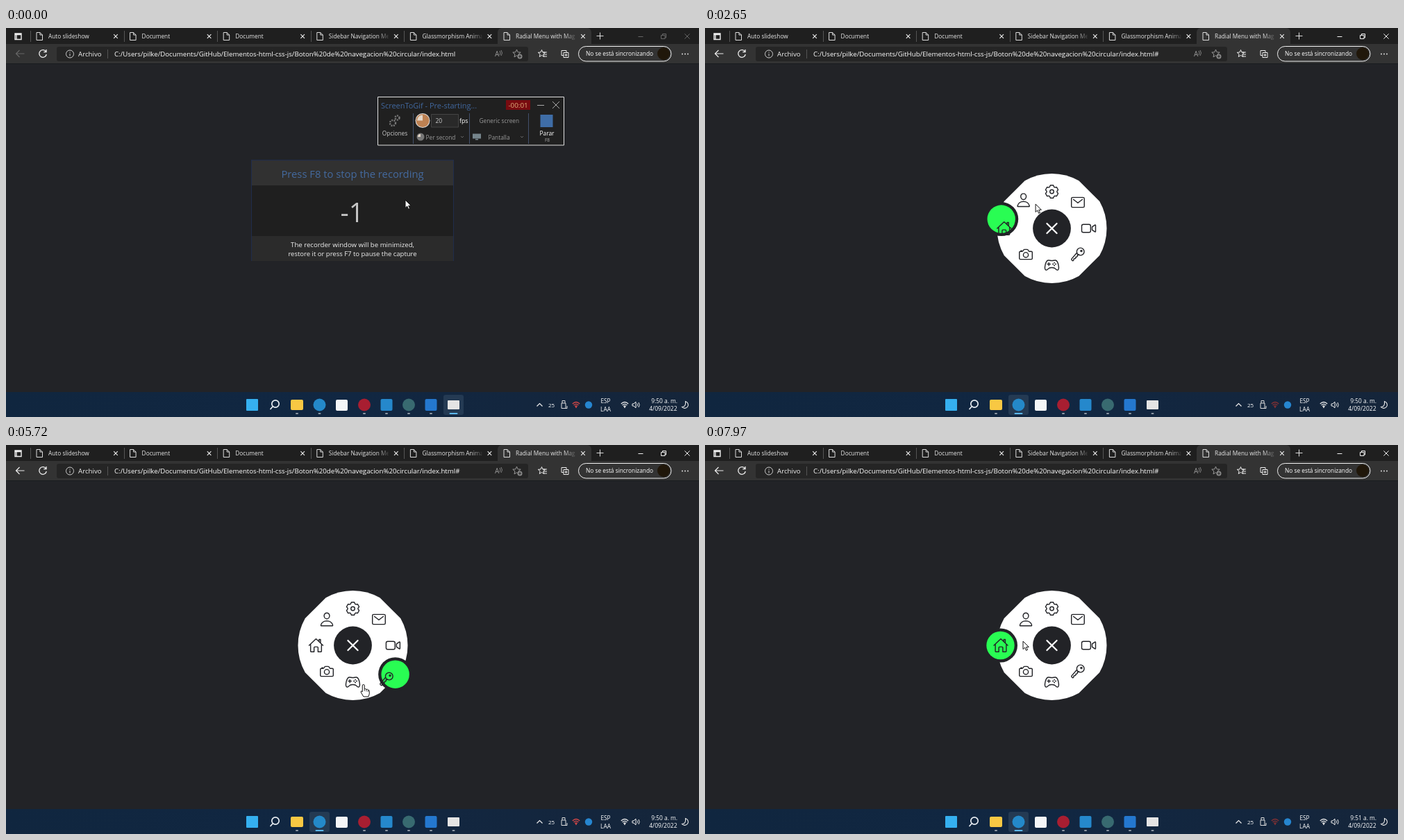
Write an HTML page with a canvas that moves like this. It is 998 px wide and 561 px high and loops after 8000 ms.

```html
<!DOCTYPE html>
<html lang="es">
<head>
<meta charset="utf-8">
<title>Radial menu</title>
<style>
html, body { margin: 0; width: 100%; height: 100%; overflow: hidden; background: #222327; }
canvas { display: block; }
</style>
</head>
<body>
<canvas id="stage" width="998" height="561"></canvas>
<script>
const c = document.getElementById('stage').getContext('2d');
const LOOP = 8000, CX = 499.5, CY = 289, BG = '#222327', INK = '#fff';
const PATH = 'C:/Users/pilke/Documents/GitHub/Elementos-html-css-js/';

const clamp = v => Math.max(0, Math.min(1, v));
const lerp = (a, b, k) => a + (b - a) * k;
const span = (t, from, to) => clamp((t - from) / (to - from));

// CSS "ease": cubic-bezier(.25, .1, .25, 1)
function ease(x) {
  if (x <= 0 || x >= 1) return clamp(x);
  let lo = 0, hi = 1;
  for (let n = 0; n < 20; n++) {
    const u = (lo + hi) / 2, v = 1 - u;
    if (.75 * v * v * u + .75 * v * u * u + u * u * u < x) lo = u; else hi = u;
  }
  return .3 * (1 - lo) ** 2 * lo + 3 * (1 - lo) * lo * lo + lo ** 3;
}

function text(str, x, y, size, color = INK, align = 'left') {
  c.font = `${size}px "Open Sans", "Noto Sans", sans-serif`;
  c.textAlign = align;
  c.fillStyle = color;
  c.fillText(str, x, y);
}
function box(x, y, w, h, color, r = 0) {
  c.fillStyle = color;
  c.beginPath();
  c.roundRect(x, y, w, h, r);
  c.fill();
}
function frame(x, y, w, h, color, r = 0, width = 1) {
  c.strokeStyle = color;
  c.lineWidth = width;
  c.beginPath();
  c.roundRect(x, y, w, h, r);
  c.stroke();
}
function disc(x, y, r, color) {
  c.fillStyle = color;
  c.beginPath();
  c.arc(x, y, r, 0, 7);
  c.fill();
}
function line(d, x, y, color = INK, width = 1) {
  c.save();
  c.translate(x, y);
  c.strokeStyle = color;
  c.lineWidth = width;
  c.stroke(new Path2D(d));
  c.restore();
}
const cross = (x, y, r, color, width = 1) =>
  line(`M${-r} ${-r}L${r} ${r}M${r} ${-r}L${-r} ${r}`, x, y, color, width);

// ---- menu icons on a 512 grid ----
function gearPath() {
  let d = '';
  for (let k = 0; k < 6; k++)
    for (const [r, a] of [[168, -25], [212, -13], [212, 13], [168, 25]]) {
      const w = (k * 60 - 90 + a) * Math.PI / 180;
      d += (d ? 'L' : 'M') + (256 + r * Math.cos(w)) + ' ' + (256 + r * Math.sin(w));
    }
  return d + 'z';
}
const ring = (x, y, r) => `M${x + r} ${y}a${r} ${r} 0 10${-2 * r} 0a${r} ${r} 0 10${2 * r} 0`;
const ICONS = [
  'M80 212v236q0 16 16 16h96V328q0-24 24-24h80q24 0 24 24v136h96q16 0 16-16V212M480 256L267 52q-11-8-22 0L32 256M400 179V64h-48v69',
  'M344 144c-4 53-44 96-88 96s-84-43-88-96c-4-55 35-96 88-96s92 42 88 96zM256 304c-87 0-175 48-192 139q-1 21 16 21h352q17 0 16-21C431 352 343 304 256 304z',
  gearPath() + ring(256, 256, 62),
  'M88 96h336q40 0 40 40v240q0 40-40 40H88q-40 0-40-40V136q0-40 40-40zM112 160l144 112 144-112',
  'M375 309l82 58q23 8 23-15V160q0-23-23-15l-82 58q-7 5-7 13v80q0 8 7 13zM268 384H84q-52 0-52-52V180q0-52 52-52h184q52 0 52 52v152q0 52-52 52z',
  'M222 205L55 399q-14 16 3 36l18 18q14 14 24 8l24-24v-34l16-12 30 2 22-22-4-32 32-4 26-22-8-32 12-10 34 4 16-10' + ring(340, 167, 120) + ring(368, 144, 24),
  'M467 249c-18-83-45-136-89-149-46-12-70 12-122 12s-76-24-123-12c-44 13-71 66-90 149-19 85-15 152 22 165 26 9 49-10 71-37 25-31 56-41 120-41s94 10 119 41c22 27 46 45 71 37 41-14 40-79 21-165zM160 176v96M208 224h-96'
    + ring(292, 224, 6) + ring(336, 180, 6) + ring(336, 268, 6) + ring(380, 224, 6),
  'M350 149l-26-42q-9-11-22-11h-92q-13 0-22 11l-27 42q-8 11-21 11H80q-32 0-32 32v192q0 32 32 32h352q32 0 32-32V192q0-32-32-32h-59q-14 0-23-11zM124 158v-22h-24v22' + ring(256, 272, 80)
].map(d => new Path2D(d));

function icon(i, x, y) {
  c.save();
  c.translate(x, y);
  c.scale(.0446, .0446);
  c.translate(-256, -256);
  c.strokeStyle = BG;
  c.lineWidth = 32;
  c.lineJoin = c.lineCap = 'round';
  c.stroke(ICONS[i]);
  c.restore();
}

// ---- radial menu ----
const OPEN_AT = 1665;
const CLICKS = [[2565, 1], [2980, 2], [3400, 3], [3855, 4], [5490, 5], [5970, 6], [6725, 7], [7266, 0]];
const polar = (r, step) => {
  const a = Math.PI * (1 + step / 4);
  return [CX + r * Math.cos(a), CY + r * Math.sin(a)];
};

function menu(t) {
  const open = ease(span(t, OPEN_AT, OPEN_AT + 500));
  const active = ICONS.map((_, i) => i ? 0 : 1);
  let pos = 0;
  for (const [start, target] of CLICKS) {
    const k = ease(span(t, start, start + 500));
    pos = lerp(pos, target, k);
    active.forEach((v, i) => active[i] = lerp(v, i === target ? 1 : 0, k));
  }

  // the wide disc is slightly flat on its diagonals
  const flat = .27 * open;
  c.fillStyle = INK;
  c.beginPath();
  for (let k = 0; k < 4; k++)
    c.arc(CX, CY, lerp(27.4, 79, open), (k - .5) * Math.PI / 2 + flat, (k + .5) * Math.PI / 2 - flat);
  c.fill();

  if (open > 0) {
    c.globalAlpha = open;
    const [mx, my] = polar(74 * open, pos);
    disc(mx, my, 24.5, BG);
    disc(mx, my, 20.2, '#29fd53');
    ICONS.forEach((_, i) => icon(i, ...polar((53 + 20.5 * active[i]) * open, i * open)));
    c.globalAlpha = 1;
  }

  const shade = (a, b) => Math.round(lerp(a, b, open));
  disc(CX, CY, 27.4, `rgb(${shade(255, 34)},${shade(255, 35)},${shade(255, 39)})`);
  c.save();
  c.translate(CX, CY);
  c.rotate(open * Math.PI * 1.75);
  c.lineCap = 'round';
  line('M-10 0H10M0-10V10', 0, 0, `rgb(${shade(34, 255)},${shade(35, 255)},${shade(39, 255)})`, 2.2);
  c.restore();
}

// ---- browser ----
function page(x, y) {
  line('M-4-5.5H1L4.5-2V5.5H-4zM1-5.5V-2H4.5', x, y, '#ddd');
}
function star(x, y, r, color) {
  let d = '';
  for (let k = 0; k < 10; k++) {
    const a = k * Math.PI / 5 - Math.PI / 2, q = k % 2 ? r * .45 : r;
    d += (k ? 'L' : 'M') + q * Math.cos(a) + ' ' + q * Math.sin(a);
  }
  line(d + 'z', x, y, color);
}

function browser(t) {
  box(0, 0, 998, 24, '#1f1f1f');
  box(0, 23, 998, 29, '#333');
  box(708, 0, 135, 26, '#333', [6, 6, 0, 0]);
  line('M-4.5-4H4.5V4.5H-4.5zM-4.5-2.5H4.5M-2.5-2V4', 17.5, 12, '#eee', 1.4);
  const titles = ['Auto slideshow', 'Document', 'Document', 'Sidebar Navigation Menu',
    'Glassmorphism Animation', 'Radial Menu with Magic'];
  titles.forEach((title, i) => {
    const x = 36 + i * 134.6;
    if (i < 5) box(Math.round(x) - 1, 4, 1, 16, '#555');
    page(x + 12, 12);
    c.save();
    c.beginPath();
    c.rect(x + 25, 0, 86, 24);
    c.clip();
    const fade = c.createLinearGradient(x + 95, 0, x + 112, 0);
    fade.addColorStop(0, '#e6e6e6');
    fade.addColorStop(1, 'rgba(230,230,230,.1)');
    text(title, x + 25, 15, 8.3, fade);
    c.restore();
    cross(x + 122, 12, 2.8, '#eee', 1.1);
  });
  line('M-5 0H5M0-5V5', 855.5, 11.5, '#ddd');
  const ctl = t < 150 ? '#666' : '#f2f2f2';
  line('M-3.5 0H3.5', 914, 12.5, ctl);
  line('M-3.5-1.5H2V3.5H-3.5zM-1.5-1.5V-3.5H3.5V2H2', 947, 12, ctl);
  cross(981, 12, 3.6, ctl);

  line('M6 0H-6M-1-5L-6 0L-1 5', 20.5, 37, t < 2590 ? '#666' : '#eee', 1.2);
  line('M4.8-2.5A5.3 5.3 0 1 0 5.3 1M5-6V-2.3H1.3', 53, 37, '#eee', 1.3);
  box(73, 27, 679, 21, '#252525', 3);
  line('M5.5 0A5.5 5.5 0 1 1-5.5 0A5.5 5.5 0 1 1 5.5 0M0-.5V3M0-3V-1.8', 92, 37.5, '#ccc');
  text('Archivo', 104, 41, 9.7, '#eee');
  box(146, 31, 1, 13, '#555');
  text(PATH + 'Boton%20de%20navegacion%20circular/index.html' + (t < 2590 ? '' : '#'), 156, 41, 9.7);
  text('A', 704, 41, 10, '#999');
  line('M0-3Q2 0 0 3M2-4Q5 0 2 4', 711, 36, '#999', .8);
  star(735.5, 37, 6, '#999');
  disc(740, 41, 3.5, '#888');
  line('M-2 0H2M0-2V2', 740, 41, '#252525');
  star(771.5, 37, 5.5, '#eee');
  line('M1-2H7M2 1H7M2 4H7', 772, 37, '#eee');
  line('M-5-5H2V-2M-5-5V2H-2M-2-2H5V5H-2zM1.5-.5V3.5M-.5 1.5H3.5', 805, 37.5, '#eee');
  frame(824.5, 26.5, 133.5, 21.5, '#f2f2f2', 11);
  text('No se está sincronizando', 835, 40, 8.33);
  disc(947, 37, 9, '#20170a');
  for (const x of [974, 978, 982]) disc(x, 37.5, .9, '#eee');
  c.fillStyle = '#191b1f';
  c.fillRect(0, 51, 998, 1);
}

function status(t) {
  const shown = [[3180, 3430], [4170, 5510], [6330, 6760]]
    .reduce((m, [a, b]) => Math.max(m, span(t, a, a + 250) * (1 - span(t, b, b + 100))), 0);
  if (!shown) return;
  c.globalAlpha = shown;
  box(0, 512, 284, 13, '#2b2b2b', [0, 3, 0, 0]);
  text(PATH + '.../index.html', 3, 521.5, 8.35, '#bbb');
  c.globalAlpha = 1;
}

// ---- taskbar ----
function wifi(x, y, color) {
  line('M-5.2-1Q0-6 5.2-1M-3.4 1Q0-2.3 3.4 1M-1.7 2.8Q0 1.2 1.7 2.8', x, y, color, 1.2);
  disc(x, y + 4, 1, color);
}
function taskbar(t) {
  const bar = c.createLinearGradient(0, 0, 998, 0);
  bar.addColorStop(0, '#10263f');
  bar.addColorStop(.5, '#112742');
  bar.addColorStop(1, '#15253a');
  box(0, 525, 998, 36, bar);
  const shift = span(t, 100, 400);
  const tab = (x, k) => {
    c.globalAlpha = k;
    box(x - 14.5, 529, 29, 29, '#243a53', 3);
    c.globalAlpha = 1;
    const w = lerp(4, 12, k);
    box(x - w / 2, 555, w, 2, k > .5 ? '#5cb8ee' : '#8d98a5', 1);
  };
  tab(451.5, shift);
  tab(644.5, 1 - shift);
  for (const x of [419, 516, 548, 580, 612]) tab(x, 0);

  box(346, 535, 17, 17, '#35b0f0', 1);
  line('M5.2-1A5.2 5.2 0 1 1-5.2-1A5.2 5.2 0 1 1 5.2-1M-3.8 2.7L-7.5 7', 388, 543, '#e8edf2', 1.7);
  box(410, 536, 18, 15, '#f8c843', 2);
  disc(451.5, 543.5, 9, '#2489c9');
  box(475, 536, 17, 16, '#f4f6f8', 2);
  disc(516, 543.5, 9, '#a81e31');
  box(539.5, 535, 17, 17, '#2588cc', 2);
  disc(580, 543.5, 9, '#386a70');
  box(603.5, 535, 17, 17, '#2478cf', 2);
  box(636, 537, 17, 13, '#e4e4e4', 1);

  line('M-4 2L0-2L4 2', 768.5, 543.5, '#eee', 1.2);
  text('25', 785.5, 547, 8, INK, 'center');
  line('M-3-2H3V5.5H-3zM-2-2V-5.5H2V-2M5 2V5.5H3', 803, 543, '#ddd');
  const dim = (t > 2000 && t < 4750) || (t > 6000 && t < 6500) || t > 7750;
  wifi(821, 543, dim ? '#8a3233' : '#e04a48');
  disc(839, 543.5, 5.2, '#2686d0');
  text('ESP', 863.5, 541, 8.3, INK, 'center');
  text('LAA', 863.5, 553, 8.3, INK, 'center');
  wifi(891, 543, '#eee');
  line('M-5-1.5H-3L0-4.5V4.5L-3 1.5H-5zM2-2Q3.5 0 2 2M4-3.5Q6.5 0 4 3.5', 907, 543.5, '#eee');
  text(t < 6000 ? '9:50 a. m.' : '9:51 a. m.', 967, 541, 8.35, INK, 'right');
  text('4/09/2022', 966.5, 552, 8.5, INK, 'right');
  line('M0-5A5 5 0 1 1-5 3Q1 3 0-5z', 978.5, 543.5, '#eee', 1.1);
}

// ---- recorder ----
function pie(x, y, r, color) {
  disc(x, y, r, color);
  c.fillStyle = '#e3d6c8';
  c.beginPath();
  c.moveTo(x, y);
  c.arc(x, y, r - 1.5, Math.PI, Math.PI * 1.5);
  c.fill();
}
function recorder() {
  box(535, 99, 269, 71, '#202020');
  frame(535.5, 99.5, 268, 69.5, '#e0e0e0');
  text('ScreenToGif - Pre-starting...', 540, 115.5, 10.95, '#41689f');
  box(720, 104, 35, 14, '#780b10');
  text('-00:01', 737.5, 115, 9.8, '#e0b07c', 'center');
  line('M-5 0H5', 770, 111.5, '#aaa');
  cross(792, 111, 5, '#aaa');
  for (const x of [586, 667, 752]) box(x, 123, 1, 44, '#43506a');
  for (const [x, y, r] of [[557, 137, 4], [563.5, 129.5, 3]]) {
    c.setLineDash([2, 1.3]);
    c.lineWidth = 2.4;
    c.strokeStyle = '#777';
    c.beginPath();
    c.arc(x, y, r, 0, 7);
    c.stroke();
    c.setLineDash([]);
  }
  text('Opciones', 560, 155, 8.3, '#ccc', 'center');
  disc(600, 133.5, 10.5, '#ddd');
  pie(600, 133.5, 9.5, '#bd8152');
  box(612, 124, 40, 19, '#292929');
  frame(612.5, 124.5, 39, 18.5, '#444');
  text('20', 618.5, 137, 8.5, '#ccc');
  text('fps', 653, 137, 8.8);
  pie(597, 157, 5.5, '#777');
  text('Per second', 604.5, 160.5, 8.3, '#999');
  text('Generic screen', 681.5, 137, 8.3, '#999');
  box(672, 152.5, 12, 7, '#76858c');
  box(676, 160, 4, 1.5, '#76858c');
  text('Pantalla', 694.5, 160.5, 8.3, '#999');
  for (const x of [657, 743]) line('M-2-1L0 1L2-1', x, 157, '#666');
  box(769.5, 125, 18, 18, '#3f6da6');
  text('Parar', 779, 155, 8.4, INK, 'center');
  text('F8', 779.5, 163.5, 6.6, '#aaa', 'center');
}
function countdown() {
  box(353, 190, 292, 146, '#1f1f1f');
  box(353, 190, 292, 37, '#313131');
  box(353, 300, 292, 36, '#2b2b2b');
  line('M.5 146V.5H291.5V146', 353, 190, '#202c4c');
  text('Press F8 to stop the recording', 499, 215.5, 14.8, '#446a9f', 'center');
  text('-1', 498.5, 280, 38, '#c4c4c4', 'center');
  text('The recorder window will be minimized,', 499, 315.5, 9.65, '#f0f0f0', 'center');
  text('restore it or press F7 to pause the capture', 499, 328.5, 9.5, '#f0f0f0', 'center');
}
function overlays(t) {
  if (t >= 350) return;
  const sink = ease(span(t, 30, 350)), fade = span(t, 30, 250);
  c.save();
  c.globalAlpha = 1 - fade;
  countdown();
  c.globalAlpha = 1 - sink;
  c.translate(lerp(669, 644, sink), lerp(134, 544, sink));
  c.scale(1 - .75 * sink, 1 - .75 * sink);
  c.translate(-669, -134);
  recorder();
  c.restore();
}

// ---- pointer: time, x, y ----
const TRACK = [[0, 575, 248], [640, 575, 248], [740, 480, 224], [820, 386, 238], [950, 453, 276],
  [1090, 453, 276], [1400, 475, 279], [2050, 475, 279], [2430, 463, 256], [2570, 463, 256],
  [2650, 476, 254], [2900, 497, 238], [3060, 499, 238], [3330, 535, 250], [3480, 537, 251],
  [3780, 550, 288], [3880, 551, 290], [4220, 547, 329], [4520, 544, 332], [4640, 544, 332],
  [4820, 504, 334], [5050, 504, 334], [5320, 535, 336], [5510, 535, 336], [5720, 515, 346],
  [5950, 500, 342], [6320, 484, 340], [6620, 462, 328], [6760, 462, 328], [7020, 452, 300],
  [7270, 441, 277], [7570, 452, 284], [7970, 458, 283], [8000, 458, 283]];
const ARROW = new Path2D('M0 0V11.5L2.7 9L4.5 13.3L6.5 12.4L4.7 8.3H8.3z');
const HAND = new Path2D('M-1.7 1Q-1.7-.5-.2-.5T1.3 1V6Q3 5 4 6.5Q5.6 5.7 6.5 7.2Q8.3 7 8.3 9V13L7 17H0L-3.6 11Q-4.4 8.8-2.8 8.8L-1.7 10z');

function pointer(t) {
  const n = TRACK.findIndex(k => k[0] > t), a = TRACK[n - 1], b = TRACK[n];
  const k = span(t, a[0], b[0]);
  const hand = (t > 1180 && t < 2600) || (t > 2800 && t < 7130);
  c.save();
  c.translate(lerp(a[1], b[1], k), lerp(a[2], b[2], k));
  c.fillStyle = INK;
  c.strokeStyle = '#111';
  c.lineWidth = 1;
  c.fill(hand ? HAND : ARROW);
  c.stroke(hand ? HAND : ARROW);
  if (hand) line('M1.3 6V9M4 6.5V9.5M6.5 7.2V10', 0, 0, '#111', .8);
  c.restore();
}

function draw(now) {
  const t = now % LOOP;
  c.fillStyle = BG;
  c.fillRect(0, 0, 998, 561);
  browser(t);
  menu(t);
  status(t);
  taskbar(t);
  overlays(t);
  pointer(t);
  requestAnimationFrame(() => draw(performance.now() - began));
}
const began = performance.now();
draw(0);
</script>
</body>
</html>
```
